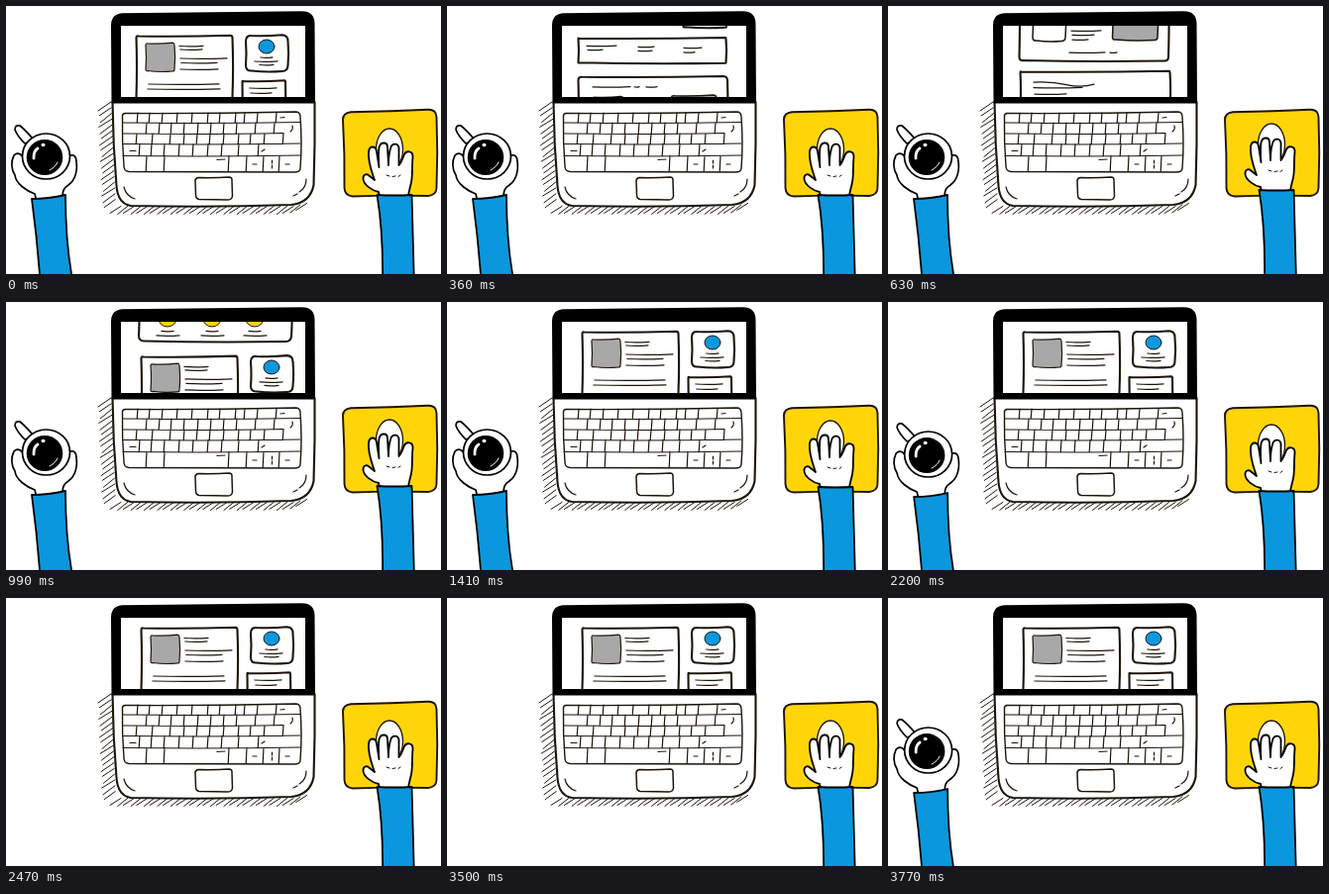
An HTML page with a canvas that plays this animation: 439 by 271 pixels, repeating every 4.77 s.

```html
<!DOCTYPE html>
<html lang="en">
<head>
<meta charset="utf-8">
<title>Desk with laptop</title>
<style>
html, body { margin: 0; width: 100%; height: 100%; overflow: hidden; background: #fff; }
canvas { display: block; }
</style>
</head>
<body>
<canvas id="stage" width="439" height="271"></canvas>
<script>
const ctx = document.getElementById('stage').getContext('2d');
const LOOP = 4770, STEP = 30;
const INK = '#1e1408', BLACK = '#000', BLUE = '#0b97dd', YELLOW = '#ffd50a', GRAY = '#a8a8a8';

const clamp = v => Math.min(1, Math.max(0, v));
const ease = v => { v = clamp(v); return v * v * (3 - 2 * v); };

function shape(d, fill, stroke, width = 1.5) {
  const p = new Path2D(d);
  if (fill) { ctx.fillStyle = fill; ctx.fill(p); }
  if (stroke) { ctx.strokeStyle = stroke; ctx.lineWidth = width; ctx.stroke(p); }
}

function disc(x, y, rx, ry, fill, stroke, width = 1) {
  ctx.beginPath();
  ctx.ellipse(x, y, rx, ry, 0, 0, 7);
  ctx.fillStyle = fill;
  ctx.fill();
  if (stroke) { ctx.strokeStyle = stroke; ctx.lineWidth = width; ctx.stroke(); }
}

// hand-drawn text line, slightly bowed
function rule(x1, x2, y, w = 1.25) {
  shape(`M${x1} ${y}Q${(x1 + x2) / 2} ${y + 0.9} ${x2} ${y - 0.2}`, null, INK, w);
}

// hand-drawn frame with bowed sides
function frame(x1, y1, x2, y2, r = 1, fill = '#fff', w = 2.1) {
  const mx = (x1 + x2) / 2, my = (y1 + y2) / 2;
  shape(`M${x1 + r} ${y1 + 0.5}Q${mx} ${y1 + 1.2} ${x2 - r} ${y1 - 0.3}Q${x2} ${y1} ${x2} ${y1 + r}
    Q${x2 + 1.2} ${my} ${x2} ${y2 - r}Q${x2} ${y2} ${x2 - r} ${y2}
    Q${mx} ${y2 + 1.2} ${x1 + r} ${y2 - 0.5}Q${x1} ${y2} ${x1} ${y2 - r}
    Q${x1 + 1} ${my} ${x1} ${y1 + r}Q${x1} ${y1} ${x1 + r} ${y1 + 0.5}Z`, fill, INK, w);
}

function paragraph(x1, x2, y, n, gap = 5) {
  for (let i = 0; i < n; i++) rule(x1 + i % 2, x2 - (i * 7) % 11, y + i * gap);
}

function pageTop() {
  frame(131.5, 30, 228.5, 94, 2);
  frame(141, 37.5, 170, 66, 2, GRAY, 1.2);
  rule(175, 199, 40.5);
  rule(176, 198, 44);
  rule(176, 223, 53);
  rule(177, 213, 57.5);
  rule(176, 214, 64);
  rule(144, 215, 79);
  rule(143, 216, 84);
  frame(242, 29.5, 284.5, 66, 6);
  disc(263, 41, 8, 7, BLUE, INK);
  rule(257, 269, 52);
  rule(251, 274, 56);
  rule(256, 270, 59.5);
  frame(238.5, 75.5, 282, 244);
  rule(246, 273, 83);
  rule(247, 268, 88);
}

function page() {
  pageTop();
  paragraph(246, 273, 100, 6, 7);
  frame(132, 106, 229, 236, 3);
  paragraph(143, 215, 118, 8, 7);

  frame(132.5, 254.5, 281.5, 280, 0.5);
  rule(141, 171, 262.5);
  rule(142, 157, 266.5);
  rule(193, 209, 263.5);
  rule(193, 207, 267.5);
  rule(239, 257, 264.5);
  rule(239, 250, 269);

  frame(132.5, 293.5, 283, 380.5, 4);
  rule(147, 185, 304);
  rule(189, 194, 304);
  rule(201, 212, 304);
  frame(146, 314, 179, 360.5, 4, '#fff', 1.5);
  frame(226.5, 312.5, 272, 359.5, 3, GRAY, 1.5);
  paragraph(185, 214, 322, 4, 6);
  rule(185, 215, 350);
  rule(186, 208, 354.3);
  rule(186, 202, 359);
  rule(183, 219, 372);
  rule(224, 231, 372);

  frame(133.5, 391, 284.5, 430);
  shape('M147 402Q165 401 180 404.5T208 404', null, INK, 1.25);
  rule(147, 196, 407.5);
  rule(148, 180, 414);

  frame(134, 446, 286, 590, 2);
  paragraph(147, 268, 460, 9, 12);

  frame(134, 606, 288, 652, 6);
  for (const x of [163, 208, 251]) {
    disc(x, 629, 9, 8, YELLOW, INK);
    rule(x - 6, x + 6, 641.5);
    rule(x - 11, x + 12, 646);
  }

  ctx.translate(5, 637);
  pageTop();
}

function hatching() {
  let d = '';
  for (let i = 0; i < 18; i++) {
    const y = 97 + i * 5.8, x = 106 + i * 0.25;
    d += `M${x} ${y}L${x - 13 + i % 3} ${y + 9 - i % 2}`;
  }
  for (let i = 0; i < 29; i++) {
    const x = 116 + i * 6.7, y = 202.5 - (i > 26 ? (i - 26) * 1.5 : 0);
    d += `M${x} ${y}L${x - 11 + i % 2} ${y + 7 + i % 2}`;
  }
  shape(d, null, INK, 1);
}

const KEYS = [
  [108, 118, 133, 145, 158, 173, 188, 204, 216, 232, 241, 254, 273],
  [118, 129, 142, 155, 167, 180, 194, 207, 220, 233, 252, 271],
  [129, 139.5, 132, 148, 166, 180, 193, 206, 220, 235, 247, 261, 280],
  [139.5, 151.5, 135, 147, 160, 175, 189, 204, 218, 235, 255],
  [151.5, 167.5, 142, 160, 225, 243, 260, 276]
];

function keyboard() {
  shape('M120 108.5Q205 109 292 107Q297 107 297 112Q299 140 297 164Q297 168 291 168Q205 168 124 167.5Q119 167 119 162Q117 137 117.5 112Q117 109 120 108.5Z', '#fff', INK, 1.4);
  let d = '';
  KEYS.forEach(([top, bottom, ...xs], row) => {
    if (row) d += `M118 ${top}Q208 ${top + 1.2} ${row === 2 ? 280 : 297} ${top - 0.5}`;
    for (const x of xs) d += `M${x} ${top}L${x - 0.8} ${bottom}`;
  });
  d += 'M277 113L281 112.5M289 121Q290 125 287 127M125 146.5L131 146.5M258 147L261 145M213 155.5L221 155M249 160L253 160M268.5 156L268.5 159M268.5 161L268.5 164M282 160L286 160';
  shape(d, null, INK, 1.2);
}

function laptop(scroll) {
  hatching();
  shape('M107.5 97Q108 140 111.5 182Q113 200 126 202Q210 204 288 201Q307 199 310.5 181Q312 140 311.5 97Z', '#fff', INK, 2.1);
  shape('M106.5 98.5L106 20Q106 7.5 118 7.2L298 5.2Q311.5 5 311.5 18L312 98.5Z', BLACK);
  ctx.save();
  ctx.beginPath();
  ctx.rect(116, 20, 186, 72);
  ctx.clip();
  ctx.fillStyle = '#fff';
  ctx.fillRect(116, 20, 186, 73);
  ctx.translate(0, -scroll);
  page();
  ctx.restore();
  keyboard();
  shape('M194 173.5Q210 174 225 173Q228.5 173 228 177L228.5 192Q228 196 224 196L195 195.5Q191.5 195 191.5 191L191 177Q191 174 194 173.5Z', '#fff', INK, 1.5);
  shape('M119 183Q121 192 130 195M303 175Q303 184 296 188M294 190L290 192', null, INK, 1.2);
}

function pad() {
  shape('M348 107.2Q390 106.5 426 104.7Q434 104.5 434.5 112Q436 148 434.5 184Q434 191.5 426 192Q388 191 350 192.5Q342 192 341.5 184Q342 150 340 115Q340 108 348 107.2Z', YELLOW, INK, 1.9);
}

function mouseArm(lift) {
  ctx.save();
  ctx.translate(0, -lift);
  disc(387, 145, 13.5, 21, '#fff', INK, 1.3);
  shape(`M377 193L376 188C370 187 361 181 360.5 175C360 170 364 169 367 172L372 176
    C369 167 365 158 366 147C367 141 373 141 374 147L376.5 163
    C376 156 375.5 149 376.5 143C378 137 385 137 385 143L386 161
    C386 155 386.5 149 388 144C389.5 138 397 138 396.5 145L396.5 161
    C398 160 400.5 154 402 150C404 146 411 146 410.5 153
    C409.5 161 410.5 171 409 178C408 184 406 188 406 193Z`, '#fff', BLACK, 1.8);
  shape('M384 171L387 172M390 172.5L393 172M396 172.5L398 171', null, INK, 1);
  shape('M374.5 191Q392 192 409.5 191Q410.5 230 412 285L380 285Q381 230 374.5 191Z', BLUE, BLACK, 1.8);
  ctx.restore();
}

function cupArm(p) {
  if (p >= 1) return;
  ctx.save();
  ctx.translate(12 * p, 158 * p);
  shape('M31 198L29 190C21 187 10 180 9 171C5 165 5 157 8 151C12 147 17 150 18 156L62 156C62 150 69 149 70.5 154C73 166 70 176 63 181C58 184 57 187 57 195Z', '#fff', BLACK, 1.7);
  shape('M25 137L19 139Q11 131 9 125Q9 120 14 121Q19 125 26 133Z', '#fff', BLACK, 1.7);
  disc(40.5, 152, 24, 23, '#fff', BLACK, 1.7);
  disc(39, 153, 18.3, 18, BLACK);
  shape('M28 154Q27.5 147 32 144', null, '#fff', 2.8);
  disc(37.5, 140.5, 2, 1.7, '#fff');
  shape('M44 166Q50 163 52 158', null, '#fff', 1);
  shape('M26 195Q43 195 60 191Q60 235 66 271L67 440L35 440L34 271Q31 232 26 195Z', BLUE, BLACK, 1.8);
  ctx.restore();
}

function draw(now) {
  const t = Math.floor((now % LOOP) / STEP) * STEP;
  const scroll = 300 * ease(t / 540) + 337 * ease((t - 540) / 540);
  const back = 1 - Math.pow(1 - clamp((t - 1380) / 420), 3);
  const lift = 5 * (ease((t - 390) / 150) - back);
  const away = ease((t - 2170) / 300) - ease((t - 3470) / 300);

  ctx.fillStyle = '#fff';
  ctx.fillRect(0, 0, 439, 271);
  ctx.lineCap = ctx.lineJoin = 'round';
  laptop(scroll);
  pad();
  mouseArm(lift);
  cupArm(away);
}

const start = performance.now();
function tick() {
  draw(performance.now() - start);
  requestAnimationFrame(tick);
}
tick();
</script>
</body>
</html>
```
